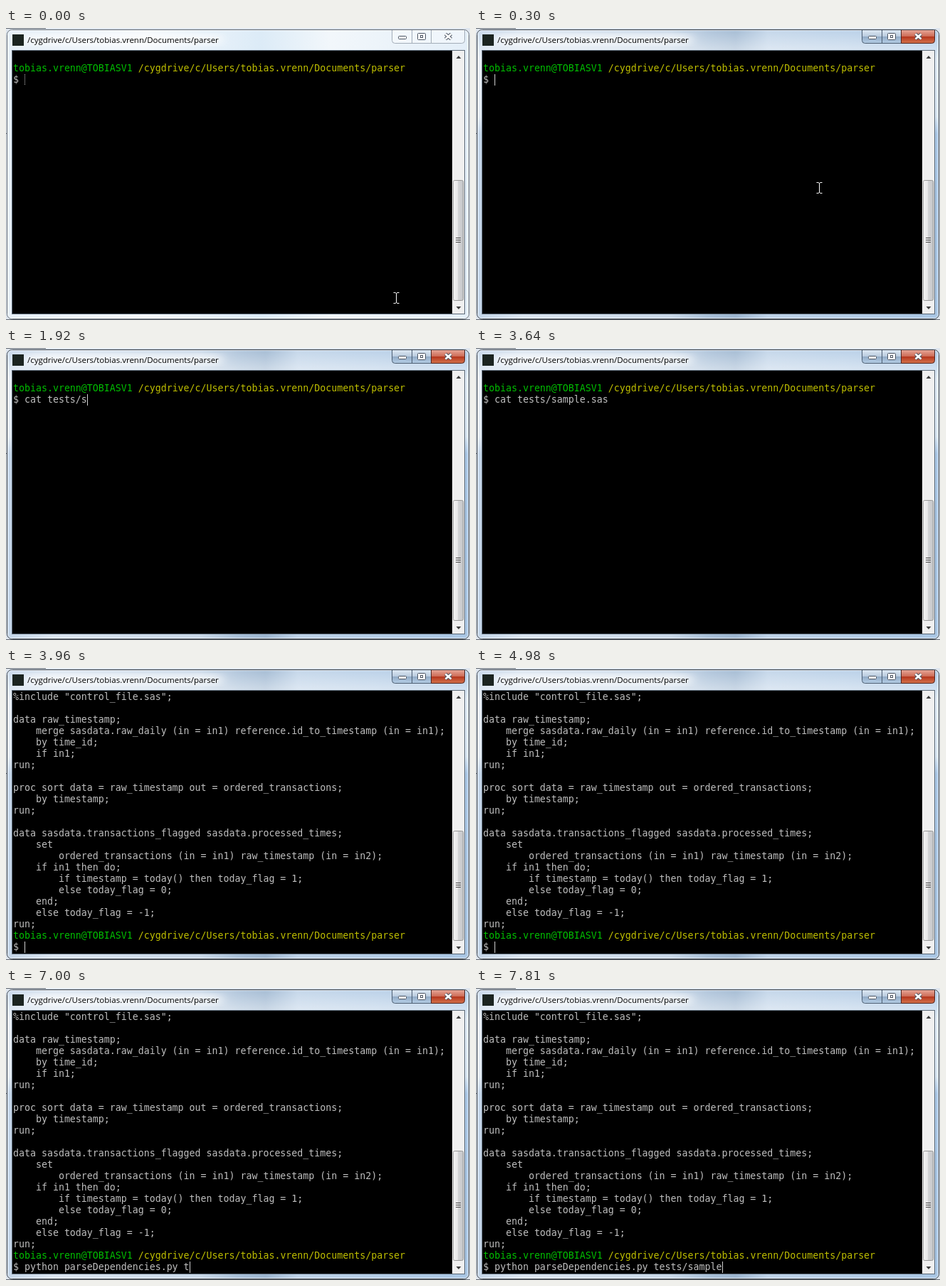
An HTML page for the animation above (8 s loop, 652x411 px).

```html
<!DOCTYPE html>
<html lang="en">
<head>
<meta charset="utf-8">
<title>Terminal</title>
<style>
  html, body { margin: 0; width: 100%; height: 100%; overflow: hidden; background: #dfe6ee; }
  svg, pre, #caret { position: absolute; }
  svg { left: 0; top: 0; }
  pre {
    left: 10px; top: 33px; margin: 0; color: #bfbfbf;
    font: 13.288px/16px "DejaVu Sans Mono", monospace;
  }
  .user { color: #00bf00; }
  .path { color: #bfbf00; }
  #caret { width: 1px; height: 16px; background: #d0d0d0; }
  #caret.idle { background: repeating-linear-gradient(#bfbfbf 0 1px, #000 1px 2px); }
  .title { font: 11.5px "Open Sans", sans-serif; }
</style>
</head>
<body>
<svg width="652" height="411" viewBox="0 0 652 411">
  <defs>
    <linearGradient id="glass">
      <stop offset="0" stop-color="#c3d5e8"/>
      <stop offset=".1" stop-color="#dbe5f0"/>
      <stop offset=".42" stop-color="#c9d8e8"/>
      <stop offset=".5" stop-color="#a9c0d8"/>
      <stop offset=".56" stop-color="#9db6d0"/>
      <stop offset=".63" stop-color="#bfd3e8"/>
      <stop offset="1" stop-color="#a9c6e4"/>
    </linearGradient>
    <linearGradient id="pale">
      <stop offset="0" stop-color="#e6eff7"/>
      <stop offset=".3" stop-color="#f6f9fc"/>
      <stop offset=".55" stop-color="#dcebf7"/>
      <stop offset=".7" stop-color="#f2f7fb"/>
      <stop offset="1" stop-color="#e3eef8"/>
    </linearGradient>
    <linearGradient id="side" x2="0" y2="1">
      <stop offset="0" stop-color="#fff" stop-opacity=".1"/>
      <stop offset=".1" stop-color="#fff" stop-opacity=".65"/>
      <stop offset=".3" stop-color="#fff" stop-opacity=".55"/>
      <stop offset=".36" stop-color="#fff" stop-opacity="0"/>
    </linearGradient>
    <linearGradient id="red" x2="0" y2="1">
      <stop offset="0" stop-color="#e5a596"/>
      <stop offset=".48" stop-color="#cd6a55"/>
      <stop offset=".5" stop-color="#b5361d"/>
      <stop offset="1" stop-color="#d4734c"/>
    </linearGradient>
    <linearGradient id="blue" x2="0" y2="1">
      <stop offset="0" stop-color="#dde8f3"/>
      <stop offset=".48" stop-color="#b9cbde"/>
      <stop offset=".5" stop-color="#92abc6"/>
      <stop offset="1" stop-color="#b4cde5"/>
    </linearGradient>
    <linearGradient id="thumbFill">
      <stop offset="0" stop-color="#f5f5f5"/>
      <stop offset=".48" stop-color="#e6e6e7"/>
      <stop offset=".5" stop-color="#d3d4d6"/>
      <stop offset="1" stop-color="#c4c6c9"/>
    </linearGradient>
    <filter id="blur"><feGaussianBlur stdDeviation="7 4"/></filter>
  </defs>

  <path d="M0 .5H56M0 148.5H2M0 410.5H652" stroke="#60666e"/>
  <rect id="frame" x="1.5" y="2.5" width="649" height="407" rx="7"/>
  <rect id="sides" x="2" y="3" width="648" height="406" rx="6" fill="url(#side)"/>
  <rect x="2.5" y="3.5" width="647" height="405" rx="6" fill="none" stroke="#fff" stroke-opacity=".7"/>
  <rect x="26" y="9" width="278" height="15" rx="7" fill="#fff" opacity=".6" filter="url(#blur)"/>

  <rect x="9" y="9" width="16" height="16" fill="#1b2420"/>
  <text class="title" x="30" y="21">/cygdrive/c/Users/tobias.vrenn/Documents/parser</text>

  <g id="buttons">
    <path id="small" d="M542.5 3V17.5Q542.5 21.5 546.5 21.5H597.5V3M570.5 3V21"/>
    <path id="close" d="M597.5 3V21.5H640.5Q644.5 21.5 644.5 17.5V3"/>
    <g fill="#fff" stroke="#4b5462">
      <rect x="551.5" y="11.5" width="11" height="4" rx="1"/>
      <rect x="578.5" y="7.5" width="11" height="9" rx="1"/>
      <rect x="582.5" y="10.5" width="3" height="3"/>
    </g>
    <path d="M617.5 8.5L625.5 15.5M625.5 8.5L617.5 15.5" stroke="#4b5462" stroke-width="4.6"/>
    <path d="M617.5 8.5L625.5 15.5M625.5 8.5L617.5 15.5" stroke="#fff" stroke-width="2.6"/>
  </g>

  <rect x="8.5" y="31.5" width="636" height="371" stroke="#5c6a78"/>
  <rect x="627" y="32" width="17" height="370" fill="#f0f0f0"/>
  <path d="M632.5 43L636 39L639.5 43ZM632.5 392L636 396L639.5 392Z" fill="#404040"/>
  <rect id="thumb" x="628.5" width="14" rx="2" fill="url(#thumbFill)" stroke="#979797"/>
  <path id="grip" d="M632 .5H639M632 3.5H639M632 6.5H639" stroke="#4a4a4a"/>
</svg>
<pre id="screen"></pre>
<div id="caret"></div>
<svg width="652" height="411">
  <path id="beam" d="M-3.5 -7.5H-1L.5 -6.5L2 -7.5H4.5M.5 -6.5V6.5M-3.5 7.5H-1L.5 6.5L2 7.5H4.5" fill="none" stroke="#fff"/>
</svg>

<script>
const LOOP = 8000, ACTIVE = 300, ENTER = 3180, OUTPUT = 3960;
const $ = id => document.getElementById(id);
const set = (id, attrs) => {
  for (const k in attrs) $(id).setAttribute(k, attrs[k]);
};

const prompt = '<span class="user">tobias.vrenn@TOBIASV1</span> ' +
  '<span class="path">/cygdrive/c/Users/tobias.vrenn/Documents/parser</span>\n$ ';

const listing = `%include "control_file.sas";

data raw_timestamp;
    merge sasdata.raw_daily (in = in1) reference.id_to_timestamp (in = in1);
    by time_id;
    if in1;
run;

proc sort data = raw_timestamp out = ordered_transactions;
    by timestamp;
run;

data sasdata.transactions_flagged sasdata.processed_times;
    set
        ordered_transactions (in = in1) raw_timestamp (in = in2);
    if in1 then do;
        if timestamp = today() then today_flag = 1;
        else today_flag = 0;
    end;
    else today_flag = -1;
run;
`;

// Each key: [time in ms, characters visible from then on]
const first = {
  text: 'cat tests/sample.sas',
  keys: [[910, 1], [1090, 3], [1360, 4], [1425, 5], [1490, 6], [1555, 7], [1620, 8],
    [1770, 9], [1845, 10], [1920, 11], [2020, 12], [2130, 14], [2240, 16],
    [2630, 17], [2800, 18], [2875, 19], [2950, 20]]
};
const second = {
  text: 'python parseDependencies.py tests/sample',
  keys: [[5510, 1], [5680, 2], [5765, 3], [5850, 4], [5990, 5], [6090, 6], [6150, 8],
    [6300, 9], [6390, 10], [6540, 28], [7000, 29], [7090, 30], [7240, 32],
    [7430, 34], [7590, 36], [7810, 40]]
};
const typed = ({ text, keys }, t) =>
  text.slice(0, keys.reduce((n, [at, count]) => t >= at ? count : n, 0));

const within = (t, a, b) => t >= a && t < b;

function drawWindow(active) {
  set('frame', { fill: `url(#${active ? 'glass' : 'pale'})`, stroke: active ? '#2c3540' : '#5d6670' });
  set('sides', { opacity: active ? 1 : 0 });
  set('small', { fill: active ? 'url(#blue)' : '#ffffff60', stroke: active ? '#4d5e72' : '#a3adb8' });
  set('close', { fill: active ? 'url(#red)' : '#ffffff60', stroke: active ? '#51251f' : '#a3adb8' });
}

function drawThumb(top) {
  set('thumb', { y: top + .5, height: 383 - top });
  set('grip', { transform: `translate(0 ${Math.floor((top + 384) / 2) - 4})` });
}

function drawBeam(t) {
  const step = [70, 150, 230, 300, 380].filter(at => t >= at).length / 5;
  const x = Math.round(548 - 82 * step), y = Math.round(380 - 194 * step);
  set('beam', { transform: `translate(${x} ${y})`, visibility: t < 910 ? 'visible' : 'hidden' });
}

function drawCaret(t, col, row) {
  const hidden = within(t, 3640, OUTPUT) || within(t, 4510, 4980);
  const caret = $('caret');
  caret.className = t < ACTIVE ? 'idle' : '';
  caret.style.cssText =
    `left:${10 + 8 * col}px;top:${33 + 16 * row}px;visibility:${hidden ? 'hidden' : 'visible'}`;
}

let shown;
function draw(now) {
  const t = now % LOOP, done = t >= OUTPUT;
  const line = typed(done ? second : first, t);
  const html = (done ? listing : ' \n') + prompt + line;
  if (html !== shown) $('screen').innerHTML = shown = html;

  const entered = within(t, ENTER, OUTPUT);
  drawCaret(t, entered ? 0 : 2 + line.length, done ? 22 : entered ? 3 : 2);
  drawWindow(t >= ACTIVE);
  drawThumb(done ? 229 : 214);
  drawBeam(t);
  requestAnimationFrame(draw);
}
draw(performance.now());
</script>
</body>
</html>
```
